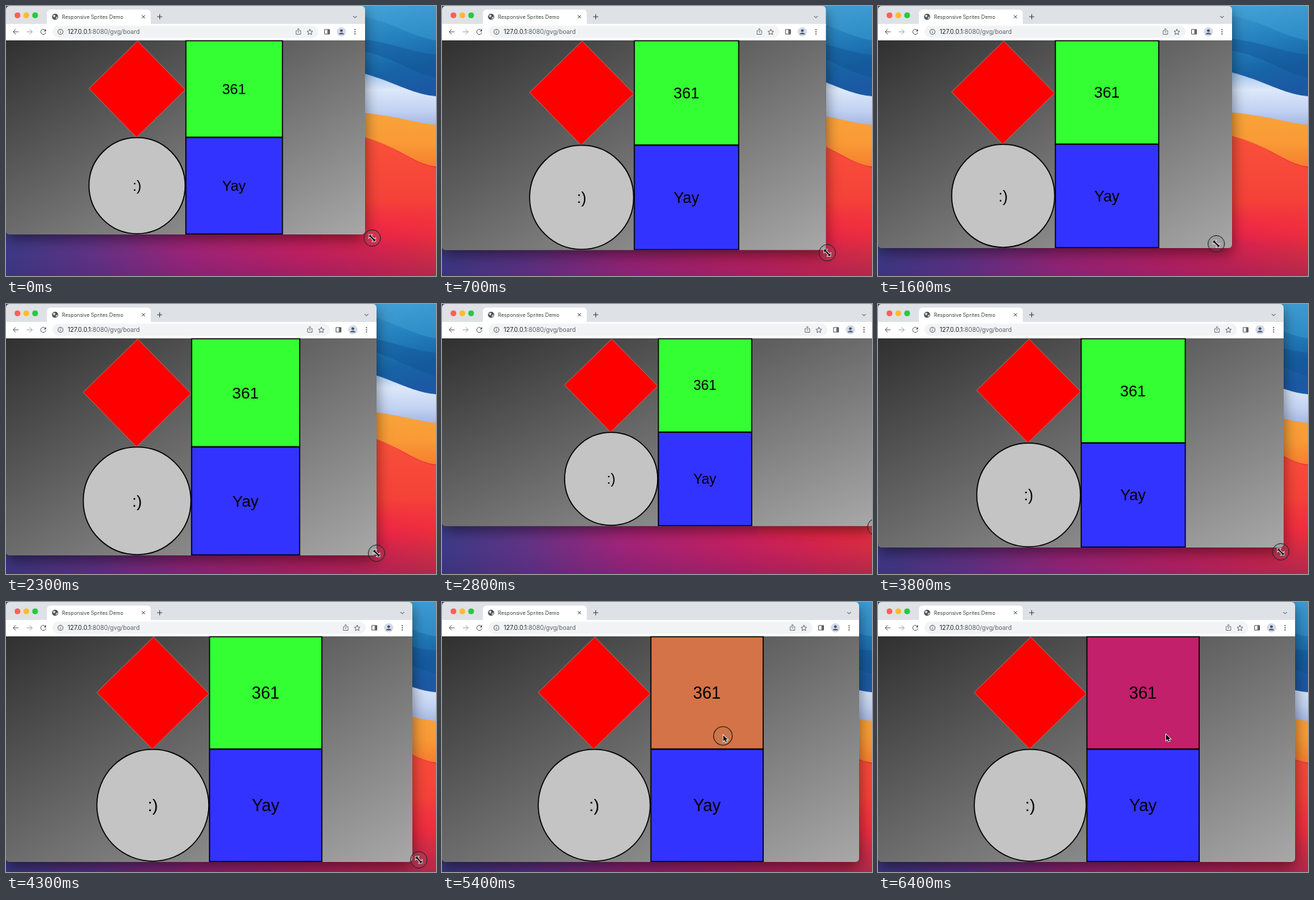
An HTML page with a canvas that plays this animation: 600 by 377 pixels, repeating every 6500 ms.

```html
<!DOCTYPE html>
<html lang="en">
<head>
<meta charset="utf-8">
<title>Responsive Sprites Demo</title>
<style>
  html, body { margin: 0; width: 100%; height: 100%; overflow: hidden; }
  canvas { display: block; width: 100vw; height: 100vh; }
</style>
</head>
<body>
<canvas id="stage" width="600" height="377"></canvas>
<script>
const ctx = document.getElementById('stage').getContext('2d');
const LOOP = 6500, STEP = 100, TOP = 48;

// time, window width, window height
const windowKeys = [
  [0, 501, 319], [500, 533, 336], [1000, 540, 348], [1600, 494, 338],
  [1900, 474, 333], [2300, 517, 351], [2900, 620, 302], [3300, 615, 296],
  [3800, 566, 340], [4300, 567, 363], [4700, 582, 363]
];
// time, pointer x, pointer y
const pointerKeys = [
  [0, 511, 324], [500, 540, 341], [1000, 534, 350], [1600, 472, 332],
  [1900, 477, 334], [2300, 517, 348], [2900, 623, 304], [3300, 608, 309],
  [3800, 562, 346], [4300, 576, 360], [4700, 583, 363], [4800, 583, 363],
  [5200, 392, 187], [5600, 392, 187], [5900, 401.5, 186]
];

function sample(keys, t) {
  const i = keys.findIndex(k => k[0] > t);
  if (i < 0) return keys[keys.length - 1].slice(1);
  const a = keys[i - 1], b = keys[i], p = (t - a[0]) / (b[0] - a[0]);
  return [a[1] + (b[1] - a[1]) * p, a[2] + (b[2] - a[2]) * p];
}

function gradient(x0, y0, x1, y1, ...stops) {
  const g = ctx.createLinearGradient(x0, y0, x1, y1);
  stops.forEach(([at, color]) => g.addColorStop(at, color));
  return g;
}

function fillPath(d, fill) {
  ctx.fillStyle = fill;
  ctx.fill(new Path2D(d));
}

function strokePath(d, color = '#5f6368', width = 1) {
  ctx.strokeStyle = color;
  ctx.lineWidth = width;
  ctx.stroke(new Path2D(d));
}

function disc(x, y, r, fill, stroke, width = 1) {
  ctx.beginPath();
  ctx.arc(x, y, r, 0, Math.PI * 2);
  if (fill) { ctx.fillStyle = fill; ctx.fill(); }
  if (stroke) { ctx.strokeStyle = stroke; ctx.lineWidth = width; ctx.stroke(); }
}

function box(x, y, w, h, r, fill) {
  ctx.beginPath();
  ctx.roundRect(x, y, w, h, r);
  ctx.fillStyle = fill;
  ctx.fill();
}

function text(str, x, y, size, color, align = 'left', family = 'Inter, sans-serif') {
  ctx.font = `${size}px ${family}`;
  ctx.textAlign = align;
  ctx.fillStyle = color;
  ctx.fillText(str, x, y);
}

function at(x, y, draw) {
  ctx.save();
  ctx.translate(x, y);
  draw();
  ctx.restore();
}

function drawDesktop() {
  ctx.fillStyle = gradient(0, 360, 600, 300, [0, '#3b3f8c'], [.2, '#68368c'],
    [.42, '#b0247c'], [.68, '#d81f60'], [.88, '#ee2547'], [1, '#f0303c']);
  ctx.fillRect(0, 0, 600, 377);
  ctx.fillStyle = gradient(0, 310, 0, 377, [0, 'rgba(60,30,100,0)'], [1, 'rgba(60,30,100,.35)']);
  ctx.fillRect(0, 310, 600, 67);
  fillPath('M440 150 C510 170 550 215 600 226 V330 C560 340 520 322 440 325Z',
    gradient(0, 180, 0, 335, [0, '#f9523a'], [.6, '#f54139'], [1, 'rgba(238,36,66,.1)']));
  fillPath('M440 130 C520 150 550 160 600 163 V224 C560 220 535 178 440 174Z',
    gradient(0, 145, 0, 222, [0, '#f9a53a'], [.6, '#f99a36'], [1, '#f7802f']));
  fillPath('M440 70 C510 85 560 125 600 120 V166 C560 162 530 147 440 146Z',
    gradient(0, 85, 0, 165, [0, '#8db9ea'], [.4, '#dce8fa'], [.75, '#c2d3f2'], [1, '#a6b8e4']));
  fillPath('M440 0 H600 V126 C555 122 530 94 440 82Z',
    gradient(520, 0, 545, 120, [0, '#3c9bd0'], [.4, '#2480bd'], [.75, '#1764a5'], [1, '#1b59a4']));
  fillPath('M470 0 H600 V48 C560 42 530 15 470 10Z', 'rgba(75,170,220,.35)');
  fillPath('M470 45 C530 45 560 65 600 68 V100 C560 92 530 62 470 60Z', 'rgba(16,78,146,.4)');
}

function drawToolbar(w) {
  ctx.fillStyle = '#dee1e6';
  ctx.fillRect(0, 0, w, 27);
  ['#fe5f57', '#febc2e', '#28c840'].forEach((c, i) => disc(16 + i * 12.3, 13, 4, c));

  box(57, 5, 145, 25, [5, 5, 0, 0], '#fff');
  ctx.fillStyle = '#fff';
  ctx.fillRect(0, 25, w, TOP - 25);
  disc(68.5, 15, 4.3, '#4b4f54');
  fillPath('M65.5 13 L68 12 L69 14 L67.5 16 L66 15Z M69.5 16 L72 14.5 L71.5 17 L69.5 18.5Z', '#dfe1e4');
  text('Responsive Sprites Demo', 78, 17.7, 7.1, '#3c4043');
  strokePath('M189.5 12.8 l4.4 4.4 m0 -4.4 l-4.4 4.4', '#45494d');
  strokePath('M211 15 h7 m-3.5 -3.5 v7', '#45494d');
  strokePath(`M${w - 16.5} 14 l2.5 2.5 l2.5 -2.5`, '#45494d');

  strokePath('M17.5 36 h-7.5 m3.5 -3.5 l-3.5 3.5 l3.5 3.5');
  strokePath('M29 36 h7.5 m-3.5 -3.5 l3.5 3.5 l-3.5 3.5', '#a4a7ab');
  strokePath('M55 34 a3.6 3.6 0 1 0 .6 3');
  fillPath('M56 32 v3.5 h-3.5Z', '#5f6368');

  box(65, 27.5, w - 130, 17, 8.5, '#f1f3f4');
  disc(76, 36, 3.6, null, '#5f6368', .9);
  strokePath('M76 35.5 v2.4 m0 -4.2 v.9', '#5f6368', .9);
  const host = '127.0.0.1';
  text(host, 86, 39.2, 8.5, '#202124');
  text(':8080/gvg/board', 86 + ctx.measureText(host).width, 39.2, 8.5, '#5f6368');

  at(w - 93, 36, () => strokePath('M-1.5 -1.5 h-1.7 v5 h6.4 v-5 h-1.7 M0 1.5 v-6 m-1.8 1.8 l1.8 -1.8 l1.8 1.8', '#5f6368', .8));
  at(w - 77, 36.3, () => strokePath('M0 -4 L1.2 -1.3 L4 -1 L1.9 .9 L2.5 3.6 L0 2.2 L-2.5 3.6 L-1.9 .9 L-4 -1 L-1.2 -1.3Z', '#5f6368', .9));
  at(w - 53, 36, () => {
    strokePath('M-3.5 -3.2 h7 v6.4 h-7Z');
    ctx.fillStyle = '#5f6368';
    ctx.fillRect(.5, -3, 3, 6);
  });
  at(w - 33, 36, () => {
    disc(0, 0, 6.5, '#d5dbe8');
    disc(0, -1.7, 1.9, '#46536b');
    fillPath('M-3.8 3.5 C-3 .4 3 .4 3.8 3.5Z', '#46536b');
  });
  [-3, 0, 3].forEach(dy => disc(w - 14, 36 + dy, .9, '#5f6368'));
}

function drawBoard(w, h, buttonColor) {
  const bh = h - TOP, cell = bh / 2 - .3, cx = w / 2, half = cell / 2;
  const k = w * bh / (w * w + bh * bh), gx = bh * k, gy = w * k, cy = TOP + bh / 2;
  ctx.fillStyle = gradient(cx - gx, cy - gy, cx + gx, cy + gy, [0, '#303030'], [1, '#a8a8a8']);
  ctx.fillRect(0, TOP, w, bh);

  const label = (str, x, y) =>
    text(str, x, y + cell * .054, cell * .148, '#000', 'center', '"Liberation Sans", Arial, sans-serif');
  const square = (y, fill, str) => {
    ctx.fillStyle = fill;
    ctx.fillRect(cx, y, cell, cell);
    ctx.strokeStyle = '#000';
    ctx.lineWidth = 1.5;
    ctx.strokeRect(cx + .5, y + .5, cell - .5, cell - .5);
    label(str, cx + half, y + half);
  };

  at(cx - half, TOP + half + .5, () => {
    ctx.rotate(.011);
    const r = half - .3, d = `M0 ${-r} L${r} 0 L0 ${r} L${-r} 0Z`;
    fillPath(d, '#f00');
    strokePath(d, '#9a8a78', .8);
  });
  square(TOP, buttonColor, '361');
  square(TOP + cell, '#3333ff', 'Yay');
  disc(cx - half, TOP + cell + half, half - .5, '#c4c4c4', '#000', 1.5);
  label(':)', cx - half, TOP + cell + half);
}

function drawResizePointer(x, y) {
  disc(x, y, 11.5, 'rgba(128,128,128,.15)', '#222');
  at(x, y, () => {
    const d = 'M-4.5 -4.5 h4 l-1.3 1.3 L3.2 1.8 L4.5 .5 v4 h-4 l1.3 -1.3 L-3.2 -1.8 L-4.5 -.5Z';
    strokePath(d, '#fff', 1.4);
    fillPath(d, '#111');
  });
}

function drawArrowPointer(x, y, pressed) {
  if (pressed) disc(x, y, 13, 'rgba(128,128,128,.08)', '#222', 1.1);
  at(x + .5, y - 1, () => {
    const d = 'M0 0 V8.4 L2 6.6 L3.4 9.7 L4.9 9 L3.5 6 H6.1Z';
    strokePath(d, '#fff', 1.5);
    fillPath(d, '#000');
  });
}

function render(t) {
  const [w, h] = sample(windowKeys, t);
  const [px, py] = sample(pointerKeys, t);
  const buttonColor = t < 5300 ? '#33ff33' : t < 5900 ? '#d47347' : '#c2206b';
  const pressed = (t >= 5300 && t < 5500) || t === 5900;

  drawDesktop();
  ctx.save();
  ctx.shadowColor = 'rgba(0,0,0,.5)';
  ctx.shadowBlur = 20;
  ctx.shadowOffsetY = 7;
  box(0, 0, w, h, 5, '#666');
  ctx.restore();

  ctx.save();
  ctx.beginPath();
  ctx.roundRect(0, 0, w, h, 5);
  ctx.clip();
  drawToolbar(w);
  drawBoard(w, h, buttonColor);
  ctx.restore();

  if (t < 4900) drawResizePointer(px, py);
  else drawArrowPointer(px, py, pressed);
}

const start = performance.now();
function tick() {
  const elapsed = (performance.now() - start) % LOOP;
  render(Math.floor(elapsed / STEP) * STEP);
  requestAnimationFrame(tick);
}
tick();
</script>
</body>
</html>
```
